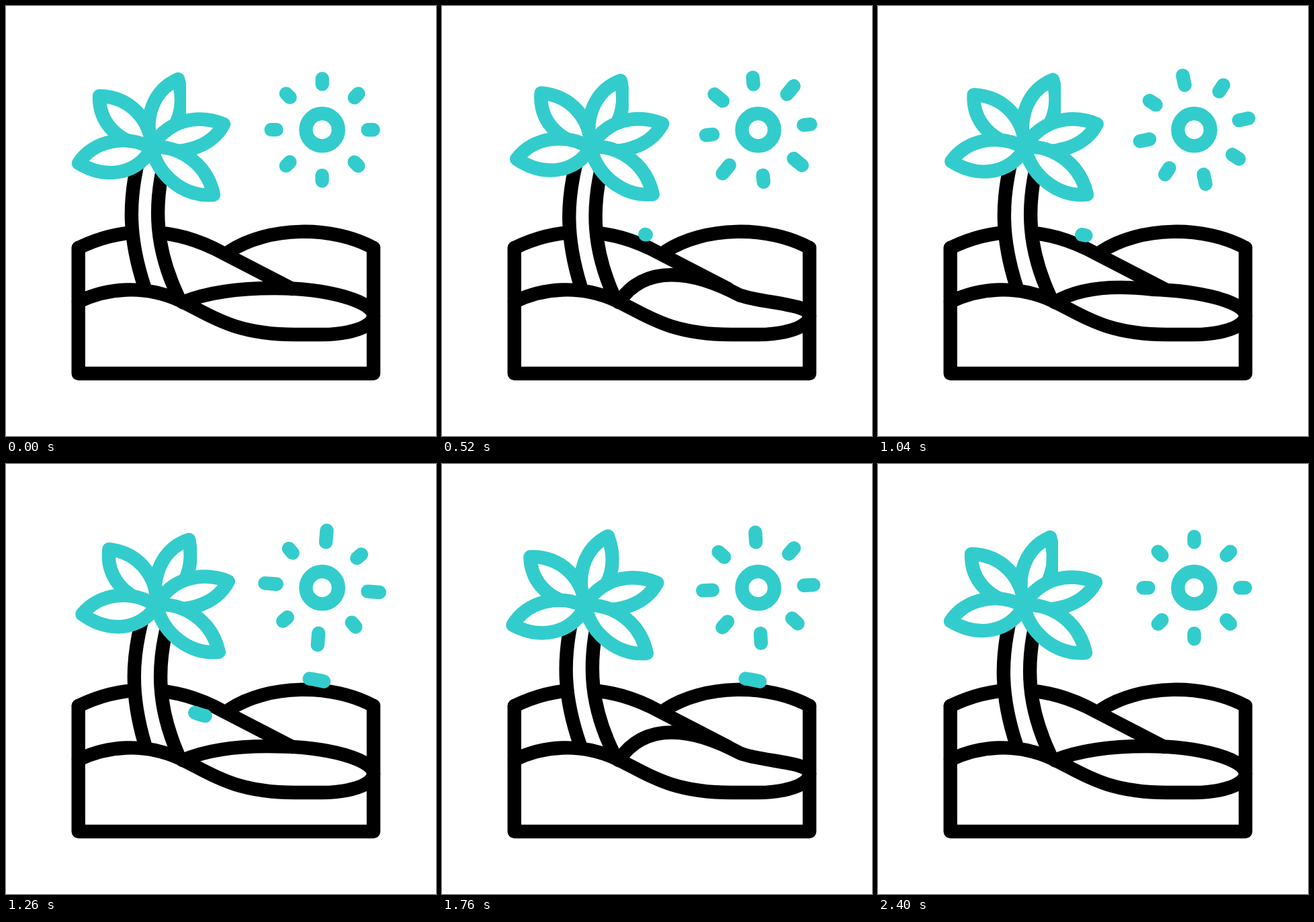
Write an HTML page that moves like this. It is 640 px wide and 640 px high and loops after 2.42 s.

```html
<!DOCTYPE html>
<html lang="en">
<head>
<meta charset="utf-8">
<title>Palm in the dunes</title>
<style>
  html, body { margin: 0; width: 100%; height: 100%; overflow: hidden; background: #fff; }
  svg { display: block; width: 100%; height: 100%; }
  path, circle { stroke-width: 20.4; stroke-linecap: round; stroke-linejoin: round; fill: none; }
  .ink path { stroke: #000; }
  .teal path, .teal circle { stroke: #33cccc; }
  .leaf { fill: #fff; }
  .ink .blank { fill: #fff; stroke: none; }
</style>
</head>
<body>
<svg viewBox="0 0 640 640">
  <defs>
    <clipPath id="edge"><rect id="edgeBox" width="268" height="640"/></clipPath>
  </defs>
  <g class="ink">
    <path d="M333 365C390 328 485 326 547 360"/>
    <path d="M108 360C165 332 235 325 310 361L426 421"/>
    <g class="sway">
      <path class="blank" d="M198 225C182 290 182 345 206 418L256 432C222 360 220 300 235 235Z"/>
      <path d="M198 225C182 290 182 345 206 418"/>
      <path d="M235 235C220 300 222 360 256 432"/>
    </g>
    <path d="M107.7 360V547H547V360"/>
    <path d="M108 440C150 420 205 414 258 438C300 457 335 489 430 489H470C510 489 547 478 547 461"/>
    <path id="shore"/>
  </g>
  <g class="teal">
    <g clip-path="url(#edge)"><g class="sway"><g class="left">
      <path class="leaf" d="M217 210C204 165 220 125 256 109C267 145 262 185 217 210Z"/>
    </g></g></g>
    <g class="sway">
      <g class="left">
        <path class="leaf" d="M217 210C215 170 185 135 139 134C138 172 165 205 217 210Z"/>
      </g>
      <g class="right">
        <path class="leaf" d="M217 210C240 170 285 160 324 176C305 212 255 225 217 210Z"/>
        <path class="leaf" d="M217 210C262 207 300 238 309 281C265 285 225 252 217 210Z"/>
      </g>
      <g class="left">
        <path class="leaf" d="M217 212C180 190 130 200 108 234C150 259 195 250 217 212Z"/>
      </g>
    </g>
    <circle cx="470.6" cy="184.2" r="24.2"/>
    <path id="rays"/>
    <path id="wind"/>
  </g>
</svg>
<script>
const LOOP = 2420, LAST = 2400, GUST = 400;
const $ = id => document.getElementById(id);
const mix = (a, b, k) => a + (b - a) * k;
const pulse = x => Math.sin(Math.PI * x) ** 2;
const turn = (sel, deg, x, y) => document.querySelectorAll(sel).forEach(
  el => el.setAttribute('transform', `rotate(${deg} ${x} ${y})`));

// Swings between 1.1 and -1.4, starting and ending at rest.
function swayAt(t) {
  const c = Math.cos(Math.PI * t / 400);
  return t < 400 || t > 2000 ? 0.55 * (1 - c) : -0.15 - 1.25 * c;
}

function bezier([x0, y0, x1, y1, x2, y2, x3, y3], u) {
  const v = 1 - u;
  const at = (a, b, c, d) => (a * v ** 3 + 3 * b * v * v * u + 3 * c * v * u * u + d * u ** 3).toFixed(2);
  return at(x0, x1, x2, x3) + ' ' + at(y0, y1, y2, y3);
}

// Steep S-curve on 0..1; lead moves it earlier.
function surge(u, lead) {
  const odds = (u / (1 - u)) ** 2.7 * Math.exp(lead);
  return odds / (1 + odds);
}

function gust(curve, t, first, step, count) {
  const i = Math.floor((t - first) / step);
  const u = (t - first - i * step) / GUST;
  if (i < 0 || i >= count || u <= 0 || u >= 1) return '';
  const tail = surge(u, 0.1), head = surge(u, 1.95);
  let d = '';
  for (let n = 0; n <= 12; n++)
    d += (n ? 'L' : 'M') + bezier(curve, mix(tail, head, n / 12));
  return d;
}

// Even and odd rays stretch in turn while the sun makes half a turn.
function rayPath(t) {
  const even = 10 * pulse(t / 800);
  const odd = t > 400 && t < 2000 ? 10 - even : 0;
  let d = '';
  for (let i = 0; i < 8; i++) {
    const a = Math.PI * (i / 4 + t / LAST);
    const at = r => (470.6 + r * Math.sin(a)).toFixed(2) + ' ' + (184.2 - r * Math.cos(a)).toFixed(2);
    d += 'M' + at(68) + 'L' + at(76 + (i % 2 ? odd : even));
  }
  return d;
}

// The water's upper edge rises and settles twice per loop.
function shorePath(t) {
  const m = pulse(t / 1200);
  const p = (x, y, dx, dy) => `${(x + m * dx).toFixed(2)} ${(y + m * dy).toFixed(2)} `;
  return 'M263 441C' + p(300, 426, 3, -45) + p(350, 420, 25, -27) + p(400, 420, 44, 10.5)
    + 'C' + p(480, 420, -4, 23.5) + p(547, 440, 0, 3) + '547 461';
}

function draw(t) {
  const s = swayAt(t);
  turn('.sway', 1.85 * s, 232, 440);
  turn('.left', 3.6 * s, 217, 210);
  turn('.right', -2.4 * s, 217, 210);
  $('edgeBox').setAttribute('width', 268 + s * (s > 0 ? 17 : 8.5));
  $('shore').setAttribute('d', shorePath(t));
  $('rays').setAttribute('d', rayPath(t));
  $('wind').setAttribute('d',
    gust([278, 369, 380, 408, 400, 317, 504, 384], t, 30, 585, 3) +
    gust([302, 340, 370, 356, 390, 300, 478, 325], t, 490, 500, 4));
}

const begin = performance.now();
function tick() {
  draw(Math.min(LAST, (performance.now() - begin) % LOOP));
  requestAnimationFrame(tick);
}
draw(0);
requestAnimationFrame(tick);
</script>
</body>
</html>
```
